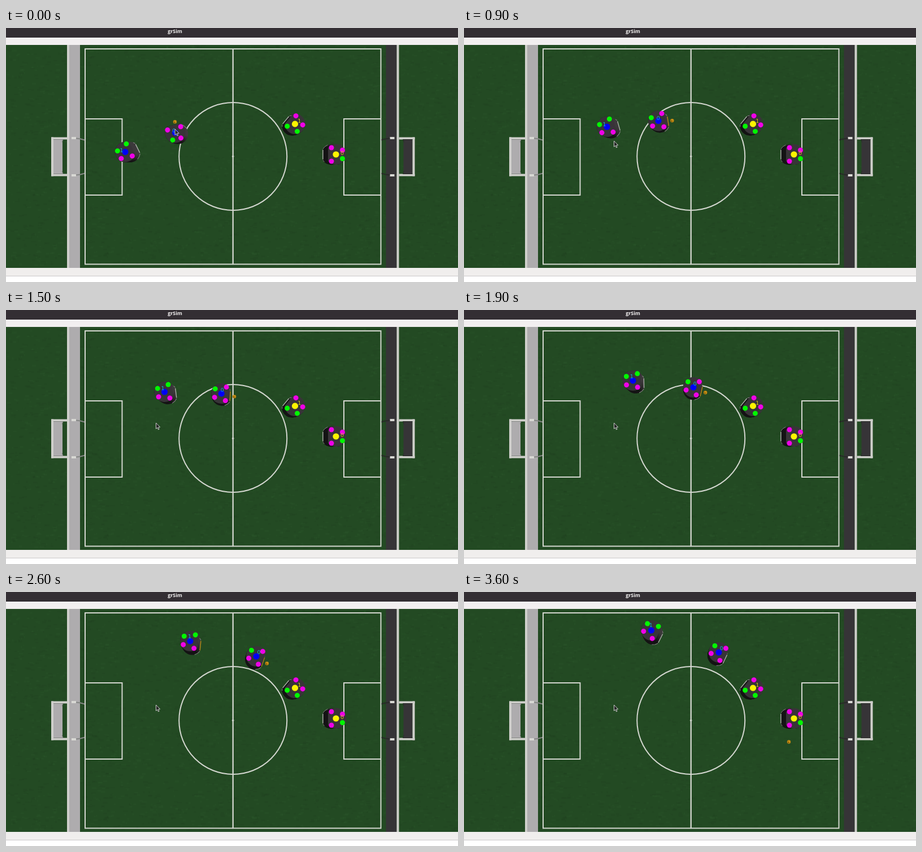
An HTML page with a canvas that plays this animation: 800x450 px, repeating every 3.7 s.

```html
<!DOCTYPE html>
<html lang="en">
<head>
<meta charset="utf-8">
<title>Robot soccer simulator</title>
<style>
  html, body { margin: 0; width: 100%; height: 100%; overflow: hidden; background: #fff; }
  canvas { display: block; width: 800px; height: 450px; }
</style>
</head>
<body>
<canvas id="stage" width="800" height="450"></canvas>
<script>
const LOOP = 3700, STEP = 100, KICK = 2900;
const MID_X = 401.75, MID_Y = 227.5, LEAN = .047;
const GREEN = '#00f800', PINK = '#f000e8', BLUE = '#0000f4', YELLOW = '#fcf400';
const LINE = '#d4d7d0', PALE = '#cfcfcb', WALL = '#aeacae', DARK = '#363437';
const ORANGE = '#b58a18', STEEL = '#adaeaa';
const POINTER = new Path2D('M0 0V10.5L2.4 8.3L4 12L5.6 11.2L4 7.8L7.2 7.5Z');
const g = document.getElementById('stage').getContext('2d');

const mix = (a, b, p) => a + (b - a) * p;
const mixAll = (a, b, p) => a.map((v, i) => mix(v, b[i], p));
const easeOut = p => 1 - (1 - p) ** 2;

// Waypoints: time, then x, y and heading in degrees
const chaser = [
  [0, 299.5, 185.5, -104], [400, 309.3, 173, -69], [900, 344, 164.5, -9],
  [1900, 406, 137, 13], [2600, 443, 114, 19], [KICK, 451, 107, 26]
];
const runner = [
  [0, 211, 219.5, -26], [900, 253, 175, -16], [1900, 299, 125, -1],
  [2600, 326, 87, 6], [3000, 331.5, 68, 27]
];

function poseAt(way, t) {
  const i = way.findIndex(k => k[0] > t);
  if (i < 0) return way[way.length - 1].slice(1);
  const a = way[i - 1], b = way[i];
  return mixAll(a, b, (t - a[0]) / (b[0] - a[0])).slice(1);
}

// The camera hangs over the centre spot, so a robot's foot lies nearer to it than its top
const footOf = ([x, y]) => [mix(x, MID_X, LEAN), mix(y, MID_Y, LEAN)];

function ballAt(t) {
  const pose = poseAt(chaser, Math.min(t, KICK));
  const [x, y] = footOf(pose), a = pose[2] * Math.PI / 180;
  const held = [x + 22 * Math.cos(a), y + 22 * Math.sin(a)];
  if (t <= KICK) return held;
  const net = [700, 231], rebound = [575, 265.5], flight = (t - KICK) / 400;
  return flight < 1 ? mixAll(held, net, flight) : mixAll(net, rebound, Math.min(1, (flight - 1) * 4 / 3));
}

function box(c, color, x, y, w, h) {
  c.fillStyle = color;
  c.fillRect(x, y, w, h);
}

function disc(c, color, x, y, r) {
  c.fillStyle = color;
  c.beginPath();
  c.arc(x, y, r, 0, 7);
  c.fill();
}

function line(c, color, width, d) {
  c.strokeStyle = color;
  c.lineWidth = width;
  c.stroke(new Path2D(d));
}

function drawHalf(c, panel, shade) {
  box(c, panel, 112, 30, 19, 395);
  box(c, PALE, 108, 30, 4, 395);
  line(c, LINE, 2, 'M402 37H140V418.5H402M140 161H205.5V296H140');
  box(c, panel, 84, 197, 16, 62);
  box(c, PALE, 80, 193.5, 4, 69);
  for (const side of [-1, 1]) {
    const y = MID_Y + .5 + side * 32.5;
    box(c, PALE, 80, y - 2, 28, 4);
    box(c, '#d8d8d4', 116, y - 2 + side * .5, 8, 4);
    line(c, shade, 1, `M84 ${y - side * 2}H101L99 ${y - side * 7}`);
    line(c, shade, 2, `M124 ${y}L132 ${y - side}L139 ${y - side * 3}`);
  }
}

function makeField() {
  const canvas = document.createElement('canvas');
  canvas.width = 800;
  canvas.height = 450;
  const c = canvas.getContext('2d');
  box(c, '#fff', 0, 0, 800, 450);
  box(c, '#234a23', 0, 30, 800, 395);

  // Faint grass mottling
  let seed = 7;
  const rnd = () => (seed = seed * 16807 % 2147483647) / 2147483647;
  for (let i = 0; i < 4000; i++) {
    const tone = rnd() < .5 ? 'rgba(0,0,0,.035)' : 'rgba(90,140,70,.04)';
    box(c, tone, rnd() * 800, 30 + rnd() * 391, 2 + rnd() * 7, 2 + rnd() * 2);
  }

  box(c, '#332e33', 0, 0, 800, 17);
  box(c, '#f2eff0', 0, 17, 800, 13);
  box(c, '#f0eeed', 0, 425, 800, 14);
  box(c, '#cbc8ca', 0, 439, 800, 1);
  c.fillStyle = '#f4f2f2';
  c.font = 'bold 9px "Open Sans", "Noto Sans", sans-serif';
  c.textAlign = 'center';
  c.fillText('grSim', 299, 9);

  drawHalf(c, WALL, '#858785');
  c.save();
  c.translate(2 * MID_X, 0);
  c.scale(-1, 1);
  drawHalf(c, DARK, '#292b29');
  c.restore();

  line(c, LINE, 2.3, `M${MID_X} 37V418`);
  c.lineWidth = 2;
  c.beginPath();
  c.arc(MID_X, MID_Y, 95.5, 0, 7);
  c.stroke();
  disc(c, LINE, MID_X, MID_Y, 1.8);
  return canvas;
}

function placed([x, y], heading, paint) {
  g.save();
  g.translate(x, y);
  g.rotate(heading * Math.PI / 180);
  paint();
  g.restore();
}

function shell(color) {
  g.fillStyle = color;
  g.beginPath();
  g.arc(0, 0, 18, .68, Math.PI * 2 - .68);
  g.closePath();
  g.fill();
}

function drawRobot(pose, id, team, kicker = STEEL) {
  const [x, y, heading] = pose, foot = footOf(pose);

  // Side wall, lit from the upper right
  for (let k = 1; k > 0; k -= .1) {
    placed(mixAll([x, y], foot, k), heading, () => {
      const a = -heading * Math.PI / 180 - .6;
      const lx = 20 * Math.cos(a), ly = 20 * Math.sin(a);
      const light = g.createLinearGradient(-lx, -ly, lx, ly);
      light.addColorStop(.45, '#141314');
      light.addColorStop(.8, '#3c393b');
      shell(light);
    });
  }
  placed(foot, heading, () => {
    line(g, kicker, 1.4, 'M14.6 -8.5V8.5');
    line(g, '#858783', 1, 'M14.5 10L11 14L6 17M14.5 -10L12 -13');
  });

  placed([x, y], heading, () => {
    shell('#383438');
    for (const side of [-1, 1]) {
      disc(g, side < 0 && id ? GREEN : PINK, 8, side * 12, 4.5);
      disc(g, side < 0 ? GREEN : PINK, -11.5, side * 7.5, 4.5);
    }
    disc(g, team, 0, 0, 5.6);
  });

  g.fillStyle = team === BLUE ? '#10b4d8' : '#d8cc10';
  g.font = '9.5px "DejaVu Sans", sans-serif';
  g.textAlign = 'center';
  g.fillText(id, x + (x - foot[0]) + 2.5, y + (y - foot[1]) + 1.2);
}

function drawBall([x, y]) {
  disc(g, '#bd8510', x, y, 3.2);
  disc(g, '#6b4a0c', x - .8, y + 1, 1);
  disc(g, '#dda520', x + .8, y - 1, .9);
}

function drawCursor(t) {
  const spot = mixAll([299, 179], [265.5, 200], easeOut(Math.min(1, t / 800)));
  placed(spot, 0, () => {
    g.fillStyle = '#262626';
    g.fill(POINTER);
    g.strokeStyle = '#c8cac8';
    g.lineWidth = 1;
    g.stroke(POINTER);
  });
}

const field = makeField();

function draw(t) {
  g.drawImage(field, 0, 0);
  drawRobot([511.5, 170, -140], 1, YELLOW);
  drawRobot([584, 224, 180], 0, YELLOW);
  drawRobot(poseAt(runner, t), 1, BLUE, t > 2300 && t < KICK ? ORANGE : STEEL);
  drawRobot(poseAt(chaser, t), 0, BLUE, t < KICK ? ORANGE : STEEL);
  drawBall(ballAt(t));
  drawCursor(t);
}

let shown = -1;
const start = performance.now();
function tick() {
  const step = Math.floor((performance.now() - start) % LOOP / STEP);
  if (step !== shown) draw((shown = step) * STEP);
  requestAnimationFrame(tick);
}
tick();
</script>
</body>
</html>
```
